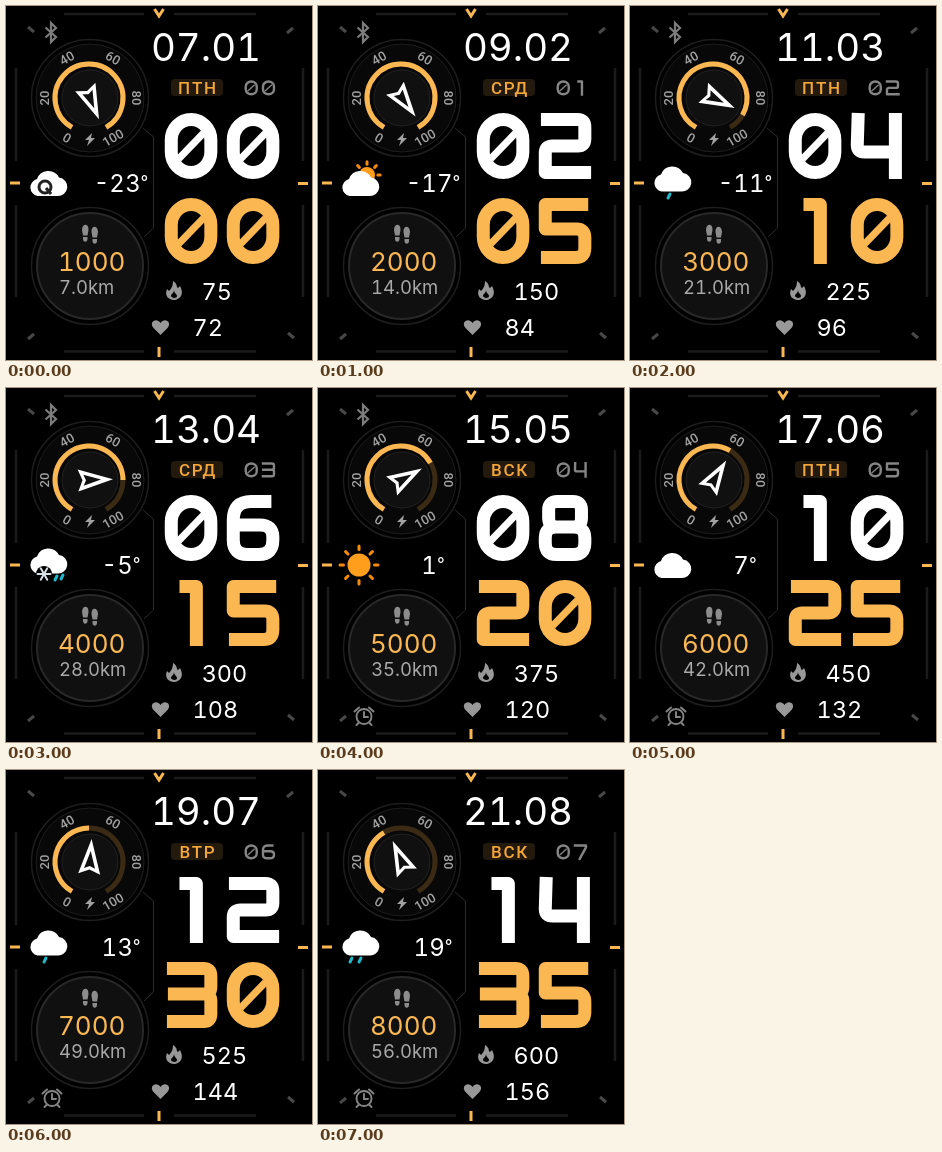
Write an HTML page that moves like this. It is 306 px wide and 354 px high and loops after 8000 ms.

```html
<!DOCTYPE html>
<html lang="ru">
<head>
<meta charset="utf-8">
<title>Watch face</title>
<style>
html, body { margin: 0; width: 100%; height: 100%; overflow: hidden; background: #000; }
svg { display: block; width: 306px; height: 354px; font-family: Inter, Roboto, sans-serif; font-variant-numeric: tabular-nums; fill: none; }
text { fill: #fff; }
.gold { stroke: #fab752; }
.mid { text-anchor: middle; }
.ring { stroke: #1d1d1d; }
.scale text { font: 500 13px Roboto, sans-serif; fill: #a2a2a2; text-anchor: middle; }
.digits { stroke-linejoin: round; }
.digits path { vector-effect: non-scaling-stroke; }
</style>
</head>
<body>
<svg viewBox="0 0 306 354" role="img" aria-label="Watch face">
  <defs>
    <path id="cloud" d="M31.500 190a8.700 8.700 0 0 1-.5-17a12 12 0 0 1 22-1.500a9.300 9.300 0 0 1-2 18.500z" fill="#fff"/>
    <path id="drop" d="M2 0L0 4" stroke="#20b9c9" stroke-width="3" stroke-linecap="round"/>
  </defs>
  <rect width="306" height="354" fill="#000"/>

  <g stroke="#1b1b1b">
    <path d="M10 62V155M10 199V291M297 62V155M297 199V291M58 8H138M168 8H250M58 345.500H138M168 345.500H250" stroke-width="2.500"/>
    <path d="M137 122L147.500 131V222L138 231" stroke="#2b2b2b"/>
  </g>
  <path d="M22 21l6 5M287 22l-6 5M22 333l6 -5M288 332l-6 -5" stroke="#484848" stroke-width="3"/>
  <path class="gold" d="M148.500 3l4.500 7l4.500 -7M153 341v10M4 177h10M292 177.500h10" stroke-width="3"/>

  <path id="bluetooth" d="M39.500 21.500L50 31L45 36V17L50 22L39.500 31.500" stroke="#7c7c7c" stroke-width="2.200"/>

  <circle class="ring" cx="84" cy="92" r="58.500" stroke-width="1.500"/>
  <circle class="ring" cx="84" cy="92" r="54" fill="#080808"/>
  <circle cx="84" cy="92" r="28" fill="#0f100f" stroke="#222"/>
  <g class="scale" id="scale"></g>
  <path id="track" stroke="#3b2a14" stroke-width="5"/>
  <path id="charge" class="gold" stroke-width="5"/>
  <path id="needle" d="M0 -23L11 12L0 7.500L-11 12ZM0 -11L-5.500 6.500L0 4L5.500 6.500Z" fill="#fff" fill-rule="evenodd"/>
  <path d="M86 127l-7 7h4l-2 6l8 -8h-4z" fill="#a2a2a2"/>

  <circle class="ring" cx="84" cy="260" r="58.500" stroke-width="1.500"/>
  <circle cx="84" cy="260" r="53" fill="#0f100f" stroke="#282828" stroke-width="2"/>
  <g fill="#8c8c8c">
    <path id="foot" d="M76 224c0 -7 7 -7 6.500 0l-1 5.500h-4.500zM77 231h4.500v2c0 3.500-4.500 3.500-4.500 0z"/>
    <use href="#foot" transform="translate(168 2) scale(-1 1)"/>
  </g>
  <text id="steps" x="52" y="265" font-size="26" style="fill:#fab752"></text>
  <text id="km" x="53" y="288" font-size="18.500" style="fill:#a9a9a9"></text>

  <g id="alarm" stroke="#858585" stroke-width="1.900" stroke-linecap="round">
    <circle cx="46" cy="328.500" r="7.500"/>
    <path d="M46 324v5h4M36.500 323.500l4.500 -4M55.500 323.500l-4.500 -4M40.500 335l-2 2M51.500 335l2 2"/>
  </g>

  <g id="weather"></g>
  <text class="mid" x="115" y="186" font-size="24"><tspan id="temp"></tspan><tspan font-size="17" dy="-4">°</tspan></text>

  <text id="date" class="mid" x="200" y="55" font-size="38.500"></text>
  <rect x="165" y="73" width="52" height="17" rx="4" fill="#23190c"/>
  <text id="day" class="mid" x="192" y="88" font-family="Roboto, sans-serif" font-size="17" font-weight="500" letter-spacing="1.800" style="fill:#f3a63a"></text>
  <g id="week" class="digits" stroke="#858585" transform="translate(238 74) scale(.278 .24)"></g>
  <g id="hour" class="digits" stroke="#fff" transform="translate(159 107)"></g>
  <g id="minute" class="digits gold" transform="translate(159 192)"></g>

  <path fill="#989898" fill-rule="evenodd" d="M167 275c5 3 3 6 5 7l2 -2c5 9-1 14-6 14s-10-4-7-11l2 2c3-3 4-6 4-10zM168 284c0 3-3 4-3 6s6 3 6 0c0-2-3-3-3-6z"/>
  <path fill="#989898" d="M154.500 329l-7 -7c-5-6 3-11 7-5c4-6 12-1 7 5z"/>
  <text id="kcal" x="195.500" y="294" font-size="23.500"></text>
  <text id="pulse" x="186.500" y="330" font-size="23.500"></text>
</svg>
<script>
const $ = id => document.getElementById(id);
const STEP = 1000, COUNT = 8;
const days = ['ПТН', 'СРД', 'ПТН', 'СРД', 'ВСК', 'ПТН', 'ВТР', 'ВСК'];
const skies = ['unknown', 'partly', 'shower', 'sleet', 'sun', 'cloud', 'shower', 'rain'];

// Digit centre lines in a 54 x 66 cell
const glyphs = [
  'M6.500 27A20.500 20.500 0 0 1 47.500 27V39A20.500 20.500 0 0 1 6.500 39Z',
  'M15 6.500H32.500V66',
  'M2 6.500H40Q47.500 6.500 47.500 14V26Q47.500 33 40 33H14Q6.500 33 6.500 40V59.500H54',
  'M2 6.500H40Q47.500 6.500 47.500 14V25Q47.500 32 40 32H3M40 32Q47.500 32 47.500 39V52Q47.500 59.500 40 59.500H2',
  'M7.500 0L6.500 32Q6.500 39 14 39H46M46 0V66',
  'M51 6.500H6.500V31H39Q47.500 31 47.500 40V50Q47.500 59.500 38 59.500H2',
  'M46 6.500H25Q6.500 6.500 6.500 25V45Q6.500 59.500 21 59.500H33Q47.500 59.500 47.500 45V42Q47.500 30 34 30H6.500',
  'M2 6.500H47.500V14L22 66',
  'M19 6.500H35Q44 6.500 44 15V23Q44 32 35 32H19Q10 32 10 23V15Q10 6.500 19 6.500ZM18 32H36Q47.500 32 47.500 43V48Q47.500 59.500 36 59.500H18Q6.500 59.500 6.500 48V43Q6.500 32 18 32Z'
];
const slash = 'M14 46L40 20';

const pad = n => String(n).padStart(2, '0');
const digits = (n, weight) => [...pad(n)].map((d, i) =>
  `<g transform="translate(${i * 62} 0) scale(.965 1)"><path d="${glyphs[d]}" stroke-width="${weight}"/>` +
  (d === '0' ? `<path d="${slash}" stroke-width="${weight * 0.55}"/>` : '') + '</g>').join('');

const polar = (pct, r, cx = 84) => {
  const a = (240 - pct * 3) * Math.PI / 180;
  return [cx + r * Math.cos(a), 92 - r * Math.sin(a)];
};
const arc = pct => `M${polar(0, 34, 83)}A34 34 0 ${pct > 60 ? 1 : 0} 1 ${polar(pct, 34, 83)}`;

const cloud = dy => `<use href="#cloud" y="${dy}"/>`;
const drop = (x, y) => `<use href="#drop" x="${x}" y="${y}"/>`;
const rays = (x, y, r, n, inner, width, color) => Array.from({ length: n }, (_, i) =>
  `<path d="M${inner} 0H${r}" stroke="${color}" stroke-width="${width}" stroke-linecap="round" transform="translate(${x} ${y}) rotate(${i * 360 / n})"/>`).join('');
const sun = (x, y, r) => `<circle cx="${x}" cy="${y}" r="${r}" fill="#ff9e1c"/>` +
  rays(x, y, r * 1.65, 8, r * 1.35, 3, '#f58a0c');

const icons = {
  unknown: () => cloud(0) + '<circle cx="39" cy="181" r="6" stroke="#222" stroke-width="3"/><path d="M40 182l5 6" stroke="#222" stroke-width="3"/>',
  partly: () => sun(49, 169, 8) + cloud(0),
  shower: () => cloud(-4.500) + drop(38, 188),
  sleet: () => cloud(-4.500) + '<circle cx="38" cy="186" r="8" fill="#000"/>' +
    rays(38, 186, 6.5, 6, 0, 2, '#d6e0e6') + drop(49, 188) + drop(55, 187),
  sun: () => sun(41, 177, 11.5),
  cloud: () => cloud(0),
  rain: () => cloud(-4.500) + drop(32, 188) + drop(41, 188)
};

$('scale').innerHTML = [30, -90, -30, 30, 90, -30].map((turn, i) => {
  const [x, y] = polar(i * 20, 46);
  return `<text transform="translate(${x} ${y}) rotate(${turn})" y="4.500">${i * 20}</text>`;
}).join('');
$('track').setAttribute('d', arc(100));

function show(k) {
  const texts = {
    date: pad(7 + 2 * k) + '.' + pad(k + 1),
    day: days[k],
    temp: 6 * k - 23,
    steps: 1000 * (k + 1),
    km: (7 * (k + 1)).toFixed(1) + 'km',
    kcal: 75 * (k + 1),
    pulse: 72 + 12 * k
  };
  for (const id in texts) $(id).textContent = texts[id];
  $('week').innerHTML = digits(k, 2.4);
  $('hour').innerHTML = digits(2 * k, 13);
  $('minute').innerHTML = digits(5 * k, 13);
  $('weather').innerHTML = icons[skies[k]]();
  $('charge').setAttribute('d', arc(Math.min(100, 110 - 10 * k)));
  const heading = Math.min(157, 172 - 28 * k);
  $('needle').setAttribute('transform', `translate(84 92) rotate(${heading})`);
  $('alarm').style.display = k >= 4 ? '' : 'none';
  $('bluetooth').style.display = k < 5 ? '' : 'none';
}

let shown = -1;
const start = performance.now();
function tick(now) {
  const k = Math.floor(Math.max(0, now - start) / STEP) % COUNT;
  if (k !== shown) show(shown = k);
  requestAnimationFrame(tick);
}
tick(start);
</script>
</body>
</html>
```
